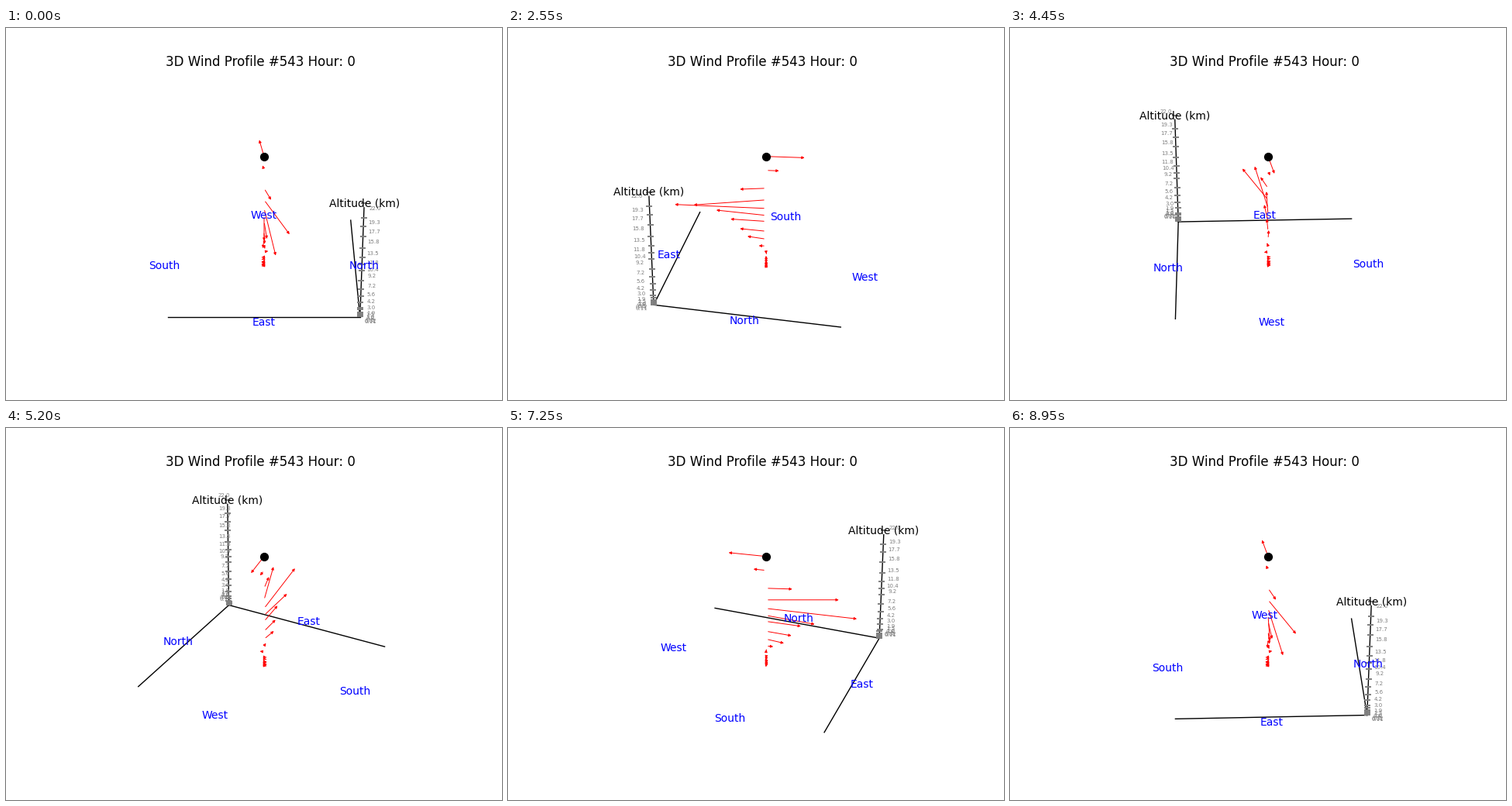
Write a matplotlib script that moves like this. It is 640x480 px and loops after 9000 ms.

```python
import numpy as np
import matplotlib.pyplot as plt
from matplotlib.animation import FuncAnimation
from matplotlib.patches import FancyArrowPatch

W, H, DPI = 640, 480, 100
FRAMES, INTERVAL = 180, 50
CX, CY, SCALE, DIST = 333.0, 237.4, 1998.0, 10.0
ELEV = np.radians(30)
EDGE, TOP_KM, MAST_KM = 0.6, 22.0, 21.2
RIM = 1.1 * EDGE
FLOOR, CEILING = -0.4125, 0.406

# wind profile: altitude (km), eastward, northward
PROFILE = [
    (1.9, 0.004, -0.016), (3.0, -0.008, 0.027), (5.6, 0.141, -0.010),
    (9.2, 0.246, 0.020), (10.4, 0.345, 0.000), (11.8, 0.603, 0.074),
    (13.5, 0.452, 0.165), (15.8, 0.174, 0.051), (17.7, 0.0, 0.0),
    (22.0, -0.255, -0.035),
]


def altitudes():
    """Heights (km) of the pressure levels in the standard atmosphere."""
    hpa = np.array([*range(1000, 899, -25), 850, *range(800, 299, -100),
                    *range(250, 99, -50), 70, 50, 30])
    km = 44.33 * (1 - (hpa / 1013.25) ** 0.19026)
    km[-1] = TOP_KM
    return [round(float(h), 2 if h < 0.5 else 1) for h in km]


def height(km):
    return FLOOR + (CEILING - FLOOR) * km / TOP_KM


def wind(km):
    keys, east, north = zip(*PROFILE)
    return np.interp(km, keys, east), np.interp(km, keys, north)


def project(x, y, z, azim):
    """Perspective view of a point, in pixels from the top left."""
    side = -x * np.sin(azim) + y * np.cos(azim)
    near = x * np.cos(azim) + y * np.sin(azim)
    up = z * np.cos(ELEV) - near * np.sin(ELEV)
    depth = DIST - near * np.cos(ELEV) - z * np.sin(ELEV)
    return CX + SCALE * side / depth, CY - SCALE * up / depth


fig = plt.figure(figsize=(W / DPI, H / DPI), dpi=DPI, facecolor="white")
ax = fig.add_axes([0, 0, 1, 1])
ax.set_xlim(0, W)
ax.set_ylim(H, 0)
ax.axis("off")


def label(text, size, color):
    return ax.text(0, 0, text, fontsize=size, color=color,
                   ha="center", va="center", zorder=4)


ax.text(328, 49.3, "3D Wind Profile #543 Hour: 0", fontsize=12,
        ha="center", va="baseline")

LEVELS = altitudes()
COMPASS = {"East": (RIM, 0), "West": (-RIM, 0),
           "North": (0, RIM), "South": (0, -RIM)}
CORNER = (EDGE, EDGE, FLOOR)
ENDS = [(-EDGE, EDGE, FLOOR), (EDGE, -EDGE, FLOOR),
        (EDGE, EDGE, height(MAST_KM))]

axis_lines = [ax.plot([], [], color="black", lw=1, zorder=2)[0] for _ in ENDS]
ticks, = ax.plot([], [], ls="none", marker="_", color="gray",
                 markersize=5.8, markeredgewidth=1.4, zorder=3)
balloon = ax.scatter(*project(0, 0, CEILING, 0), s=50, color="black", zorder=3)

km_labels = [label(str(km), 5, "gray") for km in LEVELS]
compass_labels = {name: label(name, 10, "blue") for name in COMPASS}
axis_label = label("Altitude (km)", 10, "black")

arrows = []
for km in LEVELS:
    east, north = wind(km)
    if np.hypot(east, north) < 0.005:  # calm air
        continue
    patch = FancyArrowPatch((0, 0), (1, 1), arrowstyle="-|>",
                            mutation_scale=5, lw=0.7, color="red", zorder=2.5)
    ax.add_patch(patch)
    arrows.append((patch, height(km), east, north))


def update(i):
    azim = np.radians(i * 360 / FRAMES)
    start = project(*CORNER, azim)
    for line, end in zip(axis_lines, ENDS):
        line.set_data(*zip(start, project(*end, azim)))
    ticks.set_data(*project(EDGE, EDGE, height(np.array(LEVELS)), azim))
    for text, km in zip(km_labels, LEVELS):
        text.set_position(project(RIM, RIM, height(km), azim))
    for name, (x, y) in COMPASS.items():
        compass_labels[name].set_position(project(x, y, FLOOR, azim))
    axis_label.set_position(project(EDGE, EDGE, CEILING, azim))
    for patch, z, east, north in arrows:
        patch.set_positions(project(0, 0, z, azim),
                            project(east, north, z, azim))
    return []


anim = FuncAnimation(fig, update, frames=FRAMES, interval=INTERVAL,
                     init_func=lambda: update(0), repeat=True, repeat_delay=0)
plt.show()
```
